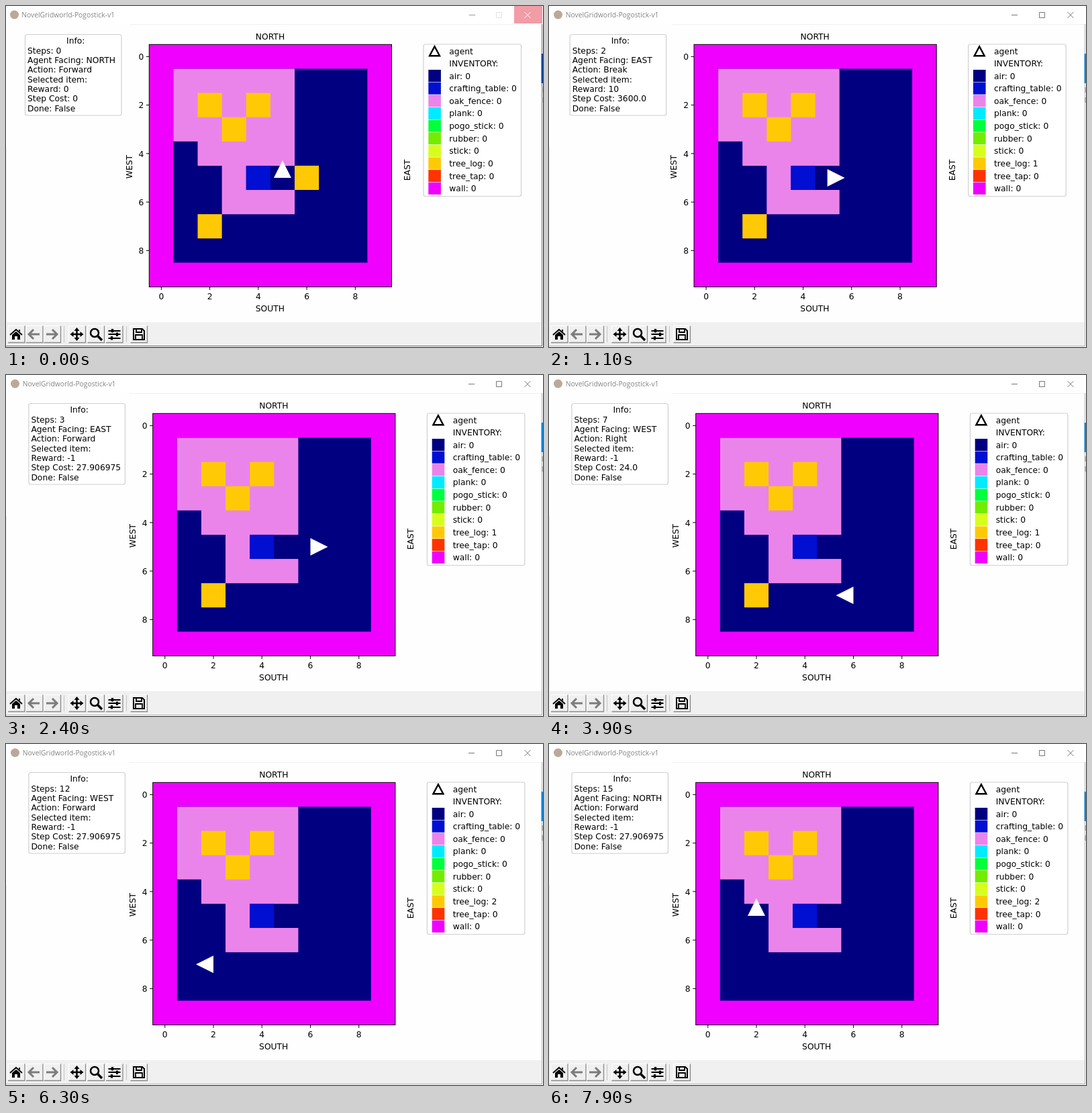
Recreate the animation shown at these times as an HTML page. Size 800x508 px, loop 8000 ms.

```html
<!DOCTYPE html>
<html lang="en">
<head>
<meta charset="utf-8">
<title>Gridworld</title>
<style>
  html, body { margin: 0; width: 100%; height: 100%; overflow: hidden; background: #fff; }
  svg { display: block; font: 12.3px "DejaVu Sans", sans-serif; }
  .title { font: 10.3px "Open Sans", sans-serif; }
  .mid { text-anchor: middle; }
  .end { text-anchor: end; }
</style>
</head>
<body>
<svg width="800" height="508" viewBox="0 0 800 508">
  <rect width="800" height="508" fill="#fefefe"/>
  <g id="plot"></g>
  <g id="tools"></g>
  <g id="bar"></g>
</svg>
<script>
const LOOP = 8000, CELL = 36.12, LEFT = 213.3, TOP = 57.3, SIZE = CELL * 10;
const COLORS = {
  air: '#000080', crafting_table: '#000fd2', oak_fence: '#eb84ea', plank: '#00ebff',
  pogo_stick: '#00ff3c', rubber: '#74ec00', stick: '#d7ff1c', tree_log: '#ffc905',
  tree_tap: '#ff3300', wall: '#f000ff'
};
const FACING = ['NORTH', 'EAST', 'SOUTH', 'WEST'];
const MOVES = [[0, -1], [1, 0], [0, 1], [-1, 0]];
const ACTIONS = {
  R: ['Right', -1, '24.0'],
  F: ['Forward', -1, '27.906975'],
  B: ['Break', 10, '3600.0']
};
const PLAN = 'RBFRFFRFFFBFRFF';
const TIMES = [500, 1100, 1700, 2500, 2900, 3300, 3800, 4300, 4800, 5300, 5800, 6300, 6800, 7300, 7800];
const SHIFT = [0, 1.4, 2.7, 5.4];   // layout drift of the first steps

const rect = (x, y, w, h, fill, more = '') =>
  `<rect x="${x}" y="${y}" width="${w}" height="${h}" fill="${fill}" ${more}/>`;
const text = (x, y, s, cls = '', more = '') =>
  `<text x="${x}" y="${y}" class="${cls}" ${more}>${s}</text>`;
const path = (d, stroke, width = 1, fill = 'none') =>
  `<path d="${d}" stroke="${stroke}" stroke-width="${width}" fill="${fill}"/>`;
const box = (x, y, w, h) => rect(x, y, w, h, '#fff', 'rx="3" stroke="#d0d0d0" stroke-width="1.2"');
const cells = (x, y, w, h, item) =>
  rect(LEFT + x * CELL, TOP + y * CELL, w * CELL, h * CELL, COLORS[item]);
const $ = id => document.getElementById(id);

function stateAt(step) {
  const s = { step, x: 5, y: 5, dir: 0, logs: 0, info: ['Forward', 0, '0'],
              trees: [[2, 2], [4, 2], [3, 3], [6, 5], [2, 7]] };
  for (const a of PLAN.slice(0, step)) {
    const [dx, dy] = MOVES[s.dir];
    s.info = ACTIONS[a];
    if (a === 'R') s.dir = (s.dir + 1) % 4;
    if (a === 'F') { s.x += dx; s.y += dy; }
    if (a === 'B') {
      s.trees = s.trees.filter(([x, y]) => x !== s.x + dx || y !== s.y + dy);
      s.logs++;
    }
  }
  return s;
}

function infoBox({ step, dir, info: [action, reward, cost] }) {
  const lines = [`Steps: ${step}`, `Agent Facing: ${FACING[dir]}`, `Action: ${action}`,
    'Selected item:', `Reward: ${reward}`, `Step Cost: ${cost}`, 'Done: False'];
  return box(28.5, 42.5, 143.5, 120.5) + text(90, 56.3, 'Info:') +
    lines.map((s, i) => text(32, 70.6 + i * 14.36, s)).join('');
}

function grid({ x, y, dir, trees }) {
  const cx = LEFT + (x + .5) * CELL, cy = TOP + (y + .5) * CELL;
  return cells(0, 0, 10, 10, 'wall') + cells(1, 1, 8, 8, 'air') +
    `<path d="M1 1H6V5H4V6H6V7H3V5H2V4H1Z" fill="${COLORS.oak_fence}"
      transform="translate(${LEFT} ${TOP}) scale(${CELL})"/>` +
    cells(4, 5, 1, 1, 'crafting_table') +
    trees.map(([a, b]) => cells(a, b, 1, 1, 'tree_log')).join('') +
    rect(LEFT, TOP, SIZE, SIZE, 'none', 'stroke="#000"') +
    `<path d="M-13 0H13L0 -26Z" fill="#fff" transform="translate(${cx} ${cy}) rotate(${dir * 90})"/>`;
}

function axes() {
  let out = '';
  for (let n = 0; n < 10; n += 2) {
    const x = LEFT + (n + .5) * CELL, y = TOP + (n + .5) * CELL, b = TOP + SIZE;
    out += path(`M${x} ${b}v4.5M${LEFT} ${y}h-4.5`, '#000') +
      text(x, 437.3, n, 'mid') + text(205.3, y + 4.7, n, 'end');
  }
  return out + text(393.5, 50.3, 'NORTH', 'mid') + text(393.3, 454.6, 'SOUTH', 'mid') +
    text(0, 0, 'WEST', 'mid', 'transform="translate(187.6 239.5) rotate(-90)"') +
    text(0, 0, 'EAST', 'mid', 'transform="translate(602 244.5) rotate(-90)"');
}

function legend(logs) {
  const items = Object.entries(COLORS).map(([name, color], i) => {
    const y = 104 + i * 18.64;
    return rect(629.3, y - 9, 18.6, 18, color) +
      text(660.3, y + 4.5, `${name}: ${name === 'tree_log' ? logs : 0}`);
  });
  return box(622, 57, 145.5, 226.5) + path('M638.5 60.2L646 74.3H631Z', '#000', 2.4, '#fff') +
    text(660.3, 71.6, 'agent') + text(660.3, 90, 'INVENTORY:') + items.join('');
}

function windowFrame(opening) {
  const o = opening ? 0 : 1, ink = opening ? '#999' : '#777';
  const edge = opening ? '#707070' : '#b5b5b5';
  return rect(0, 0, 800, 27, '#fff') + path('M184 27.5H798', '#f0f0f0') +
    `<circle cx="${12.5 + o}" cy="13" r="6.5" fill="#b8aa9a"/>` +
    text(23.3 + o * 1.5, 17, 'NovelGridworld-Pogostick-v1', 'title', 'fill="#858585"') +
    (opening ? rect(757, 0, 42, 26, '#f19ca6') : '') +
    path(`M${690 - o} 13.5h9`, ink) +
    path('M730.5 9.5h8v8h-8z', opening ? '#e2e2e2' : ink) +
    path('M772.5 9l9 9m0-9l-9 9', opening ? '#fff' : ink) +
    path('M.5 210V471', '#ececec') + path('M0 506.5H799M798.5 27V507', edge) +
    rect(797.5, 71, 2.5, 44, opening ? '#0f3f94' : '#0a84d8') +
    path('M799 121v8m0 7v8', opening ? '#999' : '#777');
}

function toolbar() {
  const button = x => rect(x, 476, 25.5, 25.5, '#f0f0f0') +
    path(`M${x + .5} 501.5V476.5h25`, '#fff') +
    path(`M${x + .5} 501.5h25V476.5`, '#8a8a8a', 1.3);
  const arrow = 'M-8 0H8M-1 -7L-8 0L-1 7';
  const at = (x, body) => `<g transform="translate(${x} 489)">${body}</g>`;
  return rect(0, 471, 798, 35.5, '#f0f0f0') +
    [2.5, 29.5, 56, 93, 121, 148.5, 185].map(button).join('') +
    path('M86.5 477V501M179.5 477V501', '#c4c4c4') +
    at(15, path('M-9 1L0 -7L9 1', '#000', 2) +
      path('M-6 1L0 -4L6 1V8H2V3H-2V8H-6ZM4 -7H6V-3L4 -5Z', 'none', 0, '#000')) +
    at(42, path(arrow, '#7c7c7c', 3)) +
    at(68, `<g transform="scale(-1 1)">${path(arrow, '#7c7c7c', 3)}</g>`) +
    at(105.5, path('M-7 0H7M0 -7V7', '#000', 2.5) +
      path('M0 -10L4 -5H-4ZM0 10L4 5H-4ZM-10 0L-5 -4V4ZM10 0L5 -4V4Z', 'none', 0, '#000')) +
    at(134, '<circle cx="-2" cy="-2" r="6" fill="none" stroke="#000" stroke-width="2.5"/>' +
      path('M3 3L9 9', '#000', 3.5)) +
    at(161.5, path('M-9 -5H9M-9 0H9M-9 6H9', '#000', 1.8) +
      path('M-3 -8V-2.5M4 -2.5V3M-4 3V8.5', '#000', 3.2)) +
    at(198, path('M-8 -8H5L8 -5V8H-8Z', '#000', 2) +
      path('M-4 -8V-3H4V-8M-5 8V1H5V8', '#000', 1.8));
}

let shown, wasOpening;
function draw(now) {
  const t = now % LOOP, opening = t < 100;
  const step = TIMES.filter(at => at <= t).length;
  if (opening !== wasOpening) $('bar').innerHTML = windowFrame(wasOpening = opening);
  if (step !== shown) {
    const s = stateAt(shown = step);
    $('plot').setAttribute('transform', `translate(${SHIFT[Math.min(step, 3)]} 0)`);
    $('plot').innerHTML = infoBox(s) + grid(s) + axes() + legend(s.logs);
  }
  requestAnimationFrame(() => draw(performance.now()));
}
$('tools').innerHTML = toolbar();
draw(0);
</script>
</body>
</html>
```
